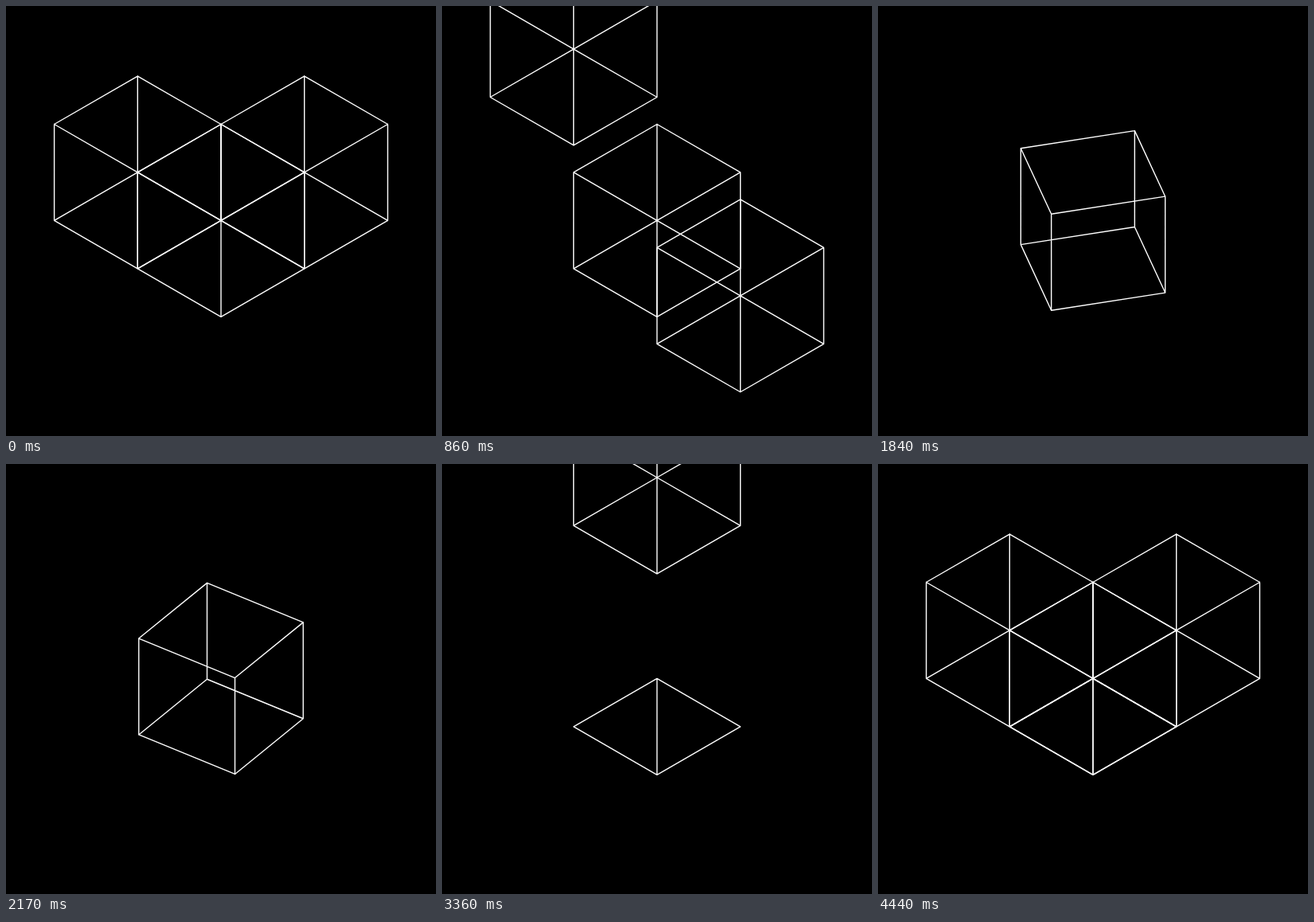
Animation of 540x540 px, one loop 4470 ms. Source, as an HTML page with a canvas:

```html
<!DOCTYPE html>
<html>
<head>
<meta charset="utf-8">
<style>
html, body { margin: 0; height: 100%; background: #000; overflow: hidden; }
canvas { display: block; }
</style>
</head>
<body>
<canvas id="stage" width="540" height="540"></canvas>
<script>
const ctx = document.getElementById('stage').getContext('2d');
const LOOP = 4470, STEP = 30;
const CX = 270, CY = 269.4;
const RX = 104.7, RY = RX / Math.sqrt(3);   // half width and height of a face seen isometrically

// Eased progress 0..1 that advances in steps, the first one shown at `first`.
function ease(t, first, start, duration) {
  if (t < first) return 0;
  const stepped = first + Math.floor((t - first) / STEP) * STEP;
  const p = Math.min(1, (stepped - start) / duration);
  return p * p * (3 - 2 * p);
}

function line(x1, y1, x2, y2) {
  ctx.moveTo(x1, y1);
  ctx.lineTo(x2, y2);
}

function cube(x, y, turn = 0) {
  const corner = i => {
    const a = turn + i * Math.PI / 2;
    return [x + RX * Math.sin(a), y - RY * Math.cos(a)];
  };
  ctx.beginPath();
  for (let i = 0; i < 4; i++) {
    const [ax, ay] = corner(i), [bx, by] = corner(i + 1);
    line(ax, ay - RY, bx, by - RY);
    line(ax, ay + RY, bx, by + RY);
    line(ax, ay - RY, ax, ay + RY);
  }
  ctx.stroke();
}

function diamond() {
  ctx.beginPath();
  ctx.moveTo(CX, CY);
  ctx.lineTo(CX + RX, CY + RY);
  ctx.lineTo(CX, CY + 2 * RY);
  ctx.lineTo(CX - RX, CY + RY);
  ctx.closePath();
  line(CX, CY, CX, CY + 2 * RY);
  ctx.stroke();
}

function sideCubes(dx, dy) {
  cube(CX - RX - dx, CY - RY - dy);
  cube(CX + RX + dx, CY - RY + dy);
}

function draw(t) {
  ctx.fillStyle = '#000';
  ctx.fillRect(0, 0, 540, 540);
  ctx.strokeStyle = '#fff';
  ctx.lineWidth = 1.4;
  ctx.lineJoin = ctx.lineCap = 'round';

  if (t < 1100) sideCubes(0, 575 * ease(t, 650, 635, 660));
  if (t < 3060) {
    cube(CX, CY, 2 * Math.PI * ease(t, 1750, 1717, 693));
    return;
  }
  diamond();
  if (t < 3510) cube(CX, CY - 540 * ease(t, 3060, 3030, 690));
  if (t >= 4080) sideCubes(486 * (1 - ease(t, 4080, 3720, 720)), 0);
  if (t >= 4440) cube(CX, CY);
}

function tick() {
  draw(performance.now() % LOOP);
  requestAnimationFrame(tick);
}
tick();
</script>
</body>
</html>
```
